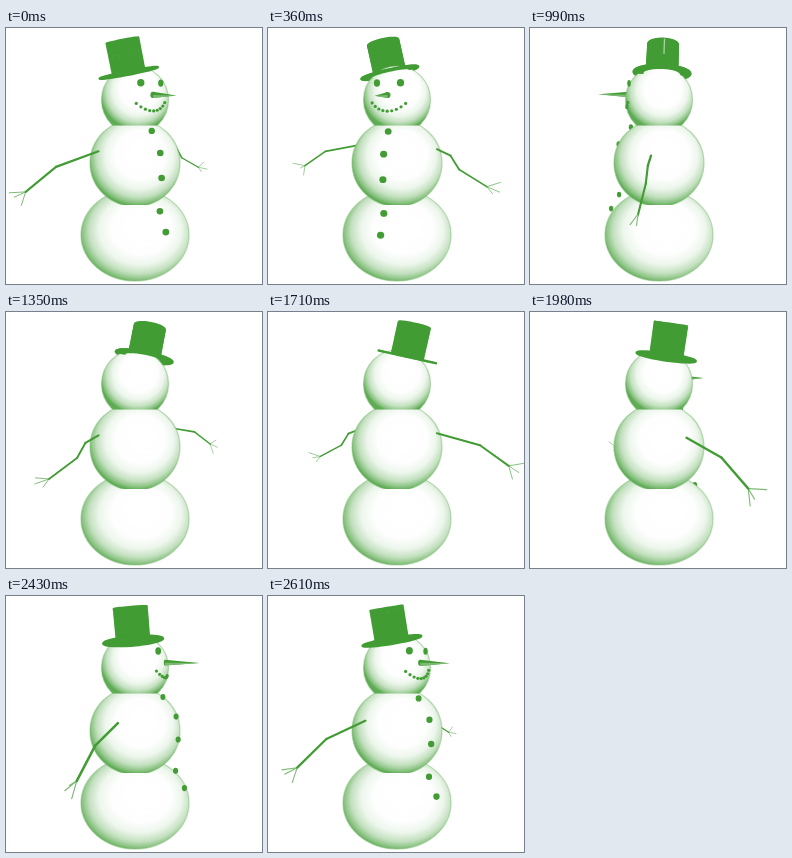
Animation of 256 by 256 pixels, one loop 2.7 s. Source, as an HTML page with a canvas:

```html
<!DOCTYPE html>
<html lang="en">
<head>
<meta charset="utf-8">
<title>Turning snowman</title>
<style>
html, body { margin: 0; width: 100%; height: 100%; overflow: hidden; background: #fff; }
canvas { display: block; width: 256px; height: 256px; }
</style>
</head>
<body>
<canvas width="256" height="256"></canvas>
<script>
const ctx = document.querySelector('canvas').getContext('2d');
const GREEN = '#429c34', DARK = '#369030', PALE = '#7cba74';
const STEP = 90, STEPS = 30, FIRST_TURN = 32;
const AXIS_X = 129, HORIZON = 62, DISTANCE = 300;
const rad = deg => deg * Math.PI / 180;

// Parts are [radius, height below the horizon, sideways offset].
const arms = [
  { side: -90, limb: [[40, 57], [80, 66], [105, 83]],
    fingers: [[118, 80.5, 3], [108, 94, -2], [113, 87, -4]] },
  { side: 90, limb: [[40, 57], [53, 62.5], [61, 75], [86, 89]],
    fingers: [[98, 85, 3], [97, 92, -3], [91, 95, 0]] }
];
const buttons = [[29, 37.6], [42, 55.5], [44, 77], [41.5, 107], [50, 122]];

function project(x, y, z) {
  const s = DISTANCE / (DISTANCE - z);
  return { x: AXIS_X + x * s, y: HORIZON + y * s, z, s };
}

function around(deg, [r, y, side = 0]) {
  const sin = Math.sin(rad(deg)), cos = Math.cos(rad(deg));
  return project(r * sin + side * cos, y, r * cos - side * sin);
}

function polygon(points, color, edge = 0) {
  ctx.beginPath();
  points.forEach(p => ctx.lineTo(p.x, p.y));
  ctx.closePath();
  ctx.fillStyle = ctx.strokeStyle = color;
  ctx.fill();
  if (!edge) return;
  ctx.lineWidth = edge;
  ctx.lineJoin = 'round';
  ctx.stroke();
}

function ellipse(x, y, rx, ry, color) {
  ctx.beginPath();
  ctx.ellipse(x, y, rx, ry, 0, 0, 2 * Math.PI);
  ctx.fillStyle = color;
  ctx.fill();
}

function line(a, b, width) {
  ctx.beginPath();
  ctx.moveTo(a.x, a.y);
  ctx.lineTo(b.x, b.y);
  ctx.lineWidth = width;
  ctx.stroke();
}

// A ball lit from the upper right and cut flat at the bottom.
function ball(y, rx, ry, bottom, lift) {
  const shade = ctx.createRadialGradient(0.16, -lift - 0.1, 0.1, 0.07, -lift, 1.12);
  [[0, '#fff'], [0.45, '#fdfefd'], [0.65, '#edf6ec'], [0.82, '#c3e0bf'], [0.93, '#8cc484'], [1, '#5dab53']]
    .forEach(stop => shade.addColorStop(...stop));
  ctx.save();
  ctx.beginPath();
  ctx.rect(0, 0, 256, bottom);
  ctx.clip();
  ctx.translate(AXIS_X, y);
  ctx.scale(rx, ry);
  ellipse(0, 0, 1, 1, shade);
  ctx.strokeStyle = '#7cba7480';
  ctx.lineWidth = 1.2 / rx;
  ctx.stroke();
  ctx.restore();
}

function drawArms(turn, front) {
  ctx.lineCap = 'round';
  for (const { side, limb, fingers } of arms) {
    const points = limb.map(p => around(turn + side, p));
    const wrist = points[points.length - 1];
    if (wrist.z > 0 !== front) continue;
    ctx.strokeStyle = PALE;
    fingers.forEach(f => line(wrist, around(turn + side, f), 0.8 * wrist.s));
    ctx.strokeStyle = GREEN;
    points.slice(1).forEach((p, i) => line(points[i], p, (1.9 - 0.2 * i) * p.s));
  }
}

function drawButtons(turn, front) {
  for (const b of buttons) {
    const p = around(turn, b);
    if (p.z > 5 !== front) continue;
    const squash = 0.65 + 0.35 * Math.abs(Math.cos(rad(turn)));
    ellipse(p.x, p.y, 3.1 * p.s * squash, 2.9 * p.s, GREEN);
  }
}

function drawNose(turn) {
  const base = around(turn, [31, 4.5]), tip = around(turn, [64, 4.5]);
  const h = 2.8 * base.s, low = { x: base.x, y: base.y + h };
  ellipse(base.x, base.y, h * Math.abs(Math.cos(rad(turn))), h, GREEN);
  polygon([{ x: base.x, y: base.y - h }, tip, low], GREEN);
  polygon([base, tip, low], PALE);
}

function drawFace(turn) {
  for (const side of [-22, 22]) {
    const p = around(turn + side, [30, -6.5]);
    const width = 0.4 + 0.6 * Math.cos(rad(turn + side));
    if (p.z > 0) ellipse(p.x, p.y, 3.3 * p.s * width, 3.4 * p.s, GREEN);
  }
  for (let i = -4; i <= 4; i++) {
    const p = around(turn + i * 7.5, [32, 19 - 7 * (i / 4) ** 2]);
    if (p.z > 0) ellipse(p.x, p.y, 1.6, 1.6, GREEN);
  }
}

// The hat leans towards the snowman's right hand.
function makeHat(turn) {
  const lean = rad(turn - 90), tilt = rad(13);
  const dx = Math.sin(lean), dz = Math.cos(lean);
  const sin = Math.sin(tilt), cos = Math.cos(tilt);
  const at = (h, r, angle) => {
    const u = r * Math.cos(angle), v = r * Math.sin(angle);
    const out = 9 + h * sin + u * cos;
    return project(1.5 + out * dx + v * dz, -17 - h * cos + u * sin, out * dz - v * dx);
  };
  const ring = (h, r, from = 0, to = 2 * Math.PI) =>
    Array.from({ length: 41 }, (_, i) => at(h, r, from + (to - from) * i / 40));
  const below = dz * sin * DISTANCE < 17 * cos;
  const brim = () => polygon(ring(0, 29), GREEN, 2.4);

  return {
    below,
    whole() {
      if (!below) brim();
      for (let h = 0; h <= 32; h++) polygon(ring(h, 16), GREEN, 1.6);
      if (below) brim();
      const seam = rad(turn + 104) - lean;
      if (Math.cos(rad(turn + 104)) > 0.95) {
        ctx.strokeStyle = '#a9d3a4';
        line(at(31, 16.5, seam), at(16, 16.5, seam), 1.3);
      }
    },
    nearBrim() {
      const from = -lean - Math.PI / 2, to = from + Math.PI;
      polygon([...ring(0, 29, from, to), ...ring(0, 20, to, from)], GREEN, 2.4);
    }
  };
}

function draw(turn) {
  const facing = Math.cos(rad(turn)) > 0;
  const hat = makeHat(turn);
  ctx.fillStyle = '#fff';
  ctx.fillRect(0, 0, 256, 256);

  drawArms(turn, false);
  drawButtons(turn, false);
  if (!facing) drawNose(turn);
  if (hat.below) hat.whole();
  ball(207, 54, 46, 256, 0.08);
  ball(135, 45, 43.5, 177, 0.13);
  ball(72, 33.5, 34, 97.5, 0.26);
  drawFace(turn);
  if (hat.below) hat.nearBrim(); else hat.whole();
  if (facing) drawNose(turn);
  drawButtons(turn, true);
  drawArms(turn, true);
}

function tick() {
  const step = Math.floor(performance.now() / STEP) % STEPS;
  draw(FIRST_TURN - step * 360 / STEPS);
  requestAnimationFrame(tick);
}
tick();
</script>
</body>
</html>
```
